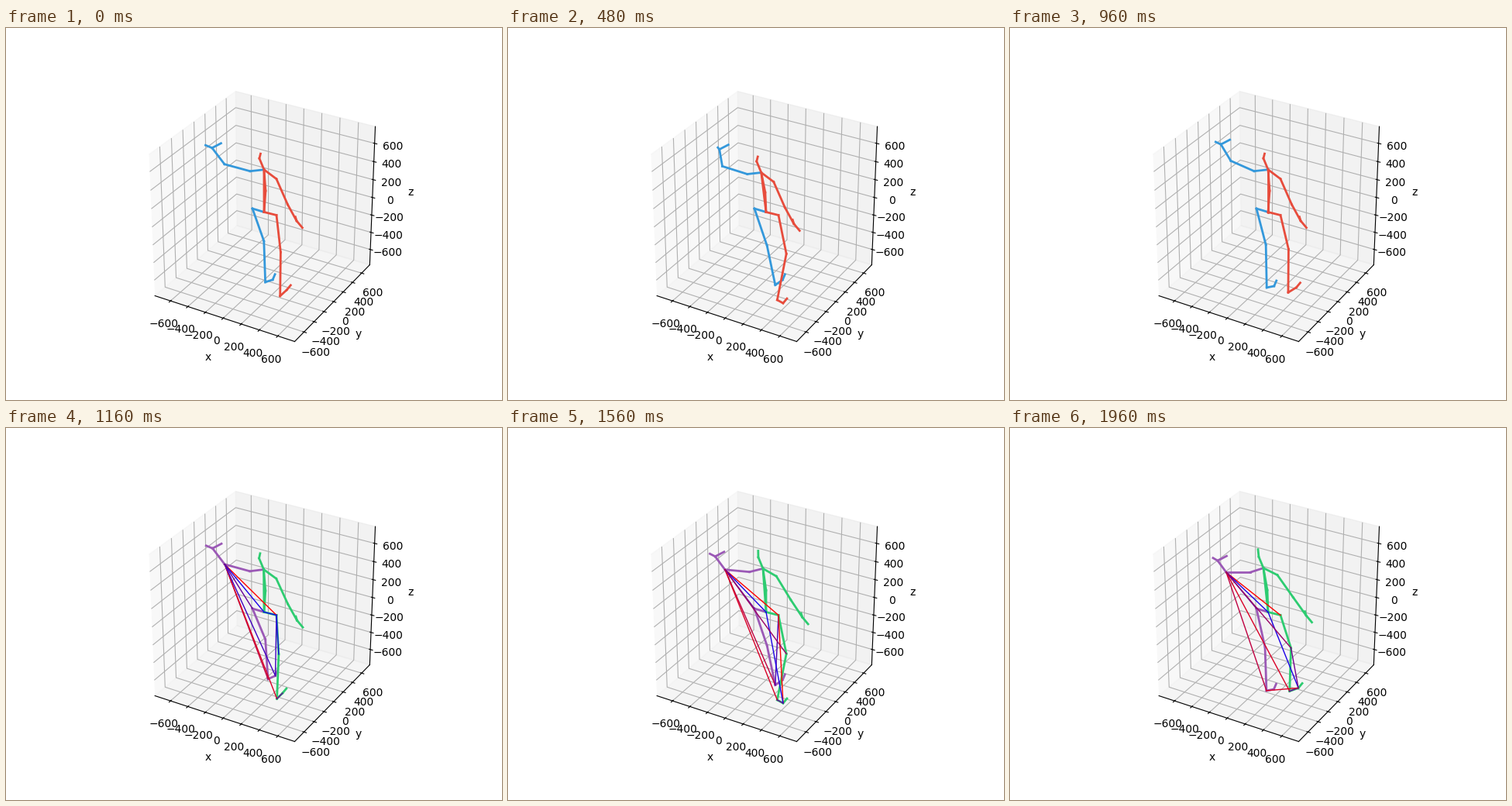
Write a matplotlib script that moves like this. It is 640 px wide and 480 px high and loops after 2000 ms.

```python
import numpy as np
import matplotlib.pyplot as plt
from matplotlib.animation import FuncAnimation
from matplotlib.lines import Line2D

W, H, STEP, FRAMES = 640, 480, 40, 50
STRIDE = 1080                     # one walking cycle, ms
SWITCH, STAGE = 1000, 250         # forecast start, time between link changes

BLUE, RED = "#3498db", "#e74c3c"
PURPLE, GREEN = "#9b59b6", "#2ecc71"

bones, paths = [], {}


def bump(t, peak, half=450):
    """Smooth rise and fall around the peak."""
    s = np.clip((t - peak) / half, -1, 1)
    return np.cos(np.pi / 2 * s) ** 2


def settle(t):
    """Eased progress of the forecast towards its last pose."""
    s = np.clip((t - 1120) / 840, 0, 1)
    return 1 - (1 - s) ** 1.5


def bone(name, parent, rest, cos=0, sin=0, move=0, peak=0, drift=0):
    """Joint hung from its parent; offsets are x + yj in pixels, y down."""
    def at(t):
        a = 2 * np.pi * t / STRIDE
        return (paths[parent](t) + rest + cos * np.cos(a) + sin * np.sin(a)
                + move * bump(t, peak) + drift * settle(t))
    paths[name] = at
    bones.append((parent, name))


paths["pelvis"] = lambda t: 333 + 237.5j
paths["spine"] = lambda t: (paths["pelvis"](t) + paths["neck"](t)) / 2 + 2

# Legs swing with the stride
bone("l_hip", "pelvis", -15 - 4.5j)
bone("l_knee", "l_hip", 14.8 + 46j, cos=-4.1j, sin=4.1 - 6j)
bone("l_ankle", "l_knee", 5.9 + 52.5j, cos=-4.1 + .5j, sin=2.6 - 3.6j)
bone("l_foot", "l_ankle", 9.5 - 4.5j, cos=1.4j, sin=-2.4j)
bone("l_toe", "l_foot", 3 - 7j)
bone("r_hip", "pelvis", 16 + 4j)
bone("r_knee", "r_hip", 9 + 47.8j, cos=-3.6, sin=-6.5 + 6j)
bone("r_ankle", "r_knee", -6 + 57.8j, cos=5.3 - 1.3j, sin=-2.3 + 1.6j)
bone("r_foot", "r_ankle", 8.6 - 1.7j, cos=-6.2j, sin=-3)
bone("r_toe", "r_foot", 5 - 6j)

# Trunk and arms make one gesture, then drift
bone("neck", "pelvis", -54.8j, move=-6.5 + 4j, peak=420, drift=-6 - 2j)
bone("head", "neck", -6 - 14.5j)
bone("crown", "head", 1.5 - 6j, drift=-2.5 - 3.5j)
bone("l_shoulder", "neck", -18 + 2j, drift=1 + 3.5j)
bone("l_elbow", "l_shoulder", -33 - 9j, move=4 - 6j, peak=800, drift=2 + 9j)
bone("l_wrist", "l_elbow", -16 - 21j, move=17 - 1j, peak=640, drift=5 + 6j)
bone("l_hand", "l_wrist", 11.5 - 6j)
bone("l_thumb", "l_wrist", -8.5 - 3.5j, move=9 + 1.5j, peak=640, drift=2.5)
bone("r_shoulder", "neck", 16 + 12j, drift=2 - 3j)
bone("r_elbow", "r_shoulder", 14.5 + 33j, drift=6 - 4j)
bone("r_wrist", "r_elbow", 11.5 + 21j, drift=5 + 2j)
bone("r_hand", "r_wrist", 7.5 + 9j)
bone("r_thumb", "r_wrist", -1.5 - 5j)
bones += [("pelvis", "spine"), ("spine", "neck")]

# Attention links with their redness: some stay, others pass by in turn
STEADY = [("l_elbow", "r_hip", 1), ("l_elbow", "pelvis", .1),
          ("l_elbow", "l_hip", .4), ("l_elbow", "l_ankle", .75),
          ("l_elbow", "r_ankle", .85), ("r_ankle", "r_foot", .4)]
PASSING = [("pelvis", "r_hip", .05), ("l_elbow", "l_foot", .25),
           ("r_hip", "l_foot", .25), ("r_hip", "r_knee", .1),
           ("r_hip", "l_ankle", .3), ("r_hip", "r_foot", 1),
           ("pelvis", "r_foot", .1), ("l_elbow", "r_knee", .6),
           ("l_ankle", "r_foot", .85), ("r_knee", "r_foot", .45)]
WINDOW = 4

fig = plt.figure(figsize=(W / 100, H / 100), dpi=100)
ax = fig.add_subplot(projection="3d")
ax.view_init(30, -60)
ax.set_box_aspect((1, 1, 1), zoom=np.sqrt(3) / 1.8294640721620434)
lim = 750 * 25 / 24
ax.set(xlim=(-lim, lim), ylim=(-lim, lim), zlim=(-lim, lim),
       xlabel="x", ylabel="y", zlabel="z")
for axis in (ax.xaxis, ax.yaxis, ax.zaxis):
    axis.set_ticks(range(-600, 601, 200))


def overlay(width, z):
    """Line in stage pixels, above the axes."""
    return fig.add_artist(Line2D([], [], lw=width, zorder=z, transform=None))


bone_lines = [overlay(2, 3) for _ in bones]
link_lines = [overlay(1, 4) for _ in range(len(STEADY) + WINDOW)]


def place(line, a, b, color):
    line.set_data([a.real, b.real], [H - a.imag, H - b.imag])
    line.set_color(color)


def update(i):
    t = i * STEP
    forecast = t >= SWITCH
    pose = {name: path(t) for name, path in paths.items()}
    left, right = (PURPLE, GREEN) if forecast else (BLUE, RED)
    for line, (a, b) in zip(bone_lines, bones):
        place(line, pose[a], pose[b], left if b.startswith("l_") else right)

    first = 2 * max(0, (t - SWITCH) // STAGE)
    links = STEADY + PASSING[first:first + WINDOW]
    for line, (a, b, w) in zip(link_lines, links):
        line.set_visible(forecast)
        place(line, pose[a], pose[b], (w, 0, 1 - w))
    return bone_lines + link_lines


anim = FuncAnimation(fig, update, frames=FRAMES, interval=STEP,
                     repeat=True, repeat_delay=0, blit=False)
plt.show()
```
